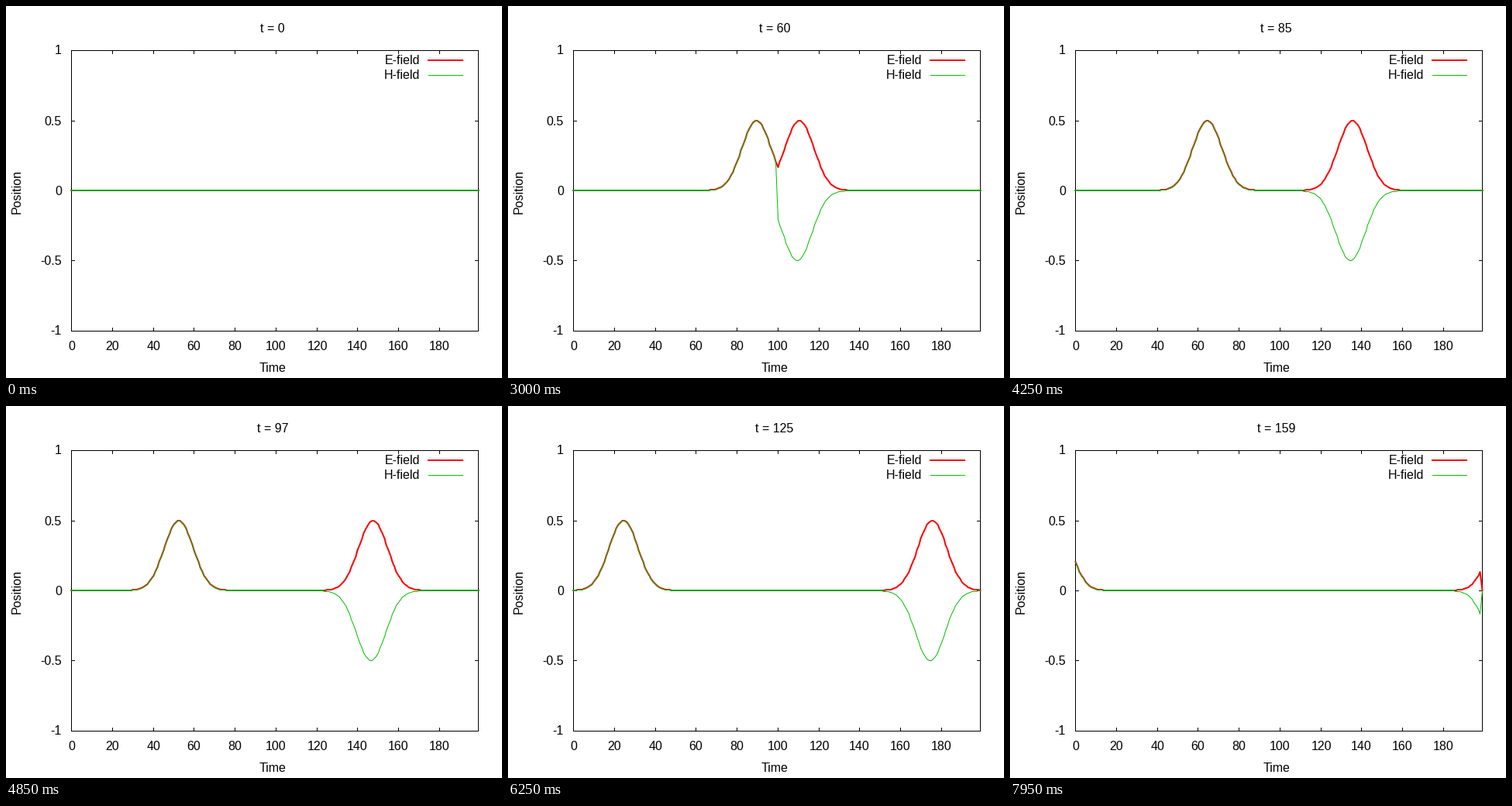
A matplotlib script that plays this animation: 640x480 px, repeating every 8 s.

```python
import numpy as np
import matplotlib.pyplot as plt
from matplotlib.animation import FuncAnimation

W, H, DPI = 640, 480, 100
PX = 72 / DPI                      # one pixel in points
LEFT, RIGHT, TOP, BOTTOM = 84.5, 609.5, 57.5, 419.5
CELLS, SOURCE, FRAMES = 200, 100, 160
RED, GREEN, REST = "#ff0000", "#00c000", "#00a000"

plt.rcParams["font.family"] = "Liberation Sans"
plt.rcParams["path.simplify"] = False

fig = plt.figure(figsize=(W / DPI, H / DPI), dpi=DPI, facecolor="white")
ax = fig.add_axes([0, 0, 1, 1])
ax.set_xlim(0, W)
ax.set_ylim(H, 0)
ax.axis("off")


def to_x(k):
    return LEFT + np.round(np.asarray(k) * (RIGHT - LEFT) / (CELLS - 1))


def to_y(v):
    mid, half = (TOP + BOTTOM) / 2, (BOTTOM - TOP) / 2
    return mid - np.round(np.asarray(v) * half)


def stroke(xs, ys, color="black", width=1, z=2, cap="projecting"):
    line, = ax.plot(xs, ys, color=color, lw=width * PX, zorder=z,
                    solid_capstyle=cap, solid_joinstyle="round", snap=False)
    return line


def label(x, y, text, align="center", turn=0):
    return ax.text(x, y, text, size=16 * PX, ha=align, va="baseline",
                   rotation=turn, rotation_mode="anchor")


def draw_axes():
    stroke([LEFT, RIGHT, RIGHT, LEFT, LEFT], [TOP, TOP, BOTTOM, BOTTOM, TOP])
    for k in range(0, CELLS, 20):
        x = to_x(k)
        stroke([x, x], [TOP, TOP + 4], z=1)
        stroke([x, x], [BOTTOM, BOTTOM - 4], z=1)
        label(x, 443.5, str(k))
    for v in (-1, -0.5, 0, 0.5, 1):
        y = to_y(v)
        stroke([LEFT, LEFT + 4], [y, y], z=1)
        stroke([RIGHT, RIGHT - 4], [y, y], z=1)
        label(72, y + 5, f"{v:g}", "right")
    label(344, 471.5, "Time")
    label(18.5, 239.5, "Position", turn=90)


def draw_legend():
    label(534, 75, "E-field", "right")
    label(534, 94, "H-field", "right")
    stroke([544, 590], [70, 70], RED, 2, cap="butt")
    stroke([545, 590], [89.5, 89.5], GREEN, 1, cap="butt")


def pulse(n):
    return 0.5 * np.exp(-((n - 49.5) / 10) ** 2)


def fields(t):
    """Both fields on the staggered grid; the last cell is held at zero."""
    k = np.arange(CELLS)
    e = pulse(t - np.abs(k - SOURCE))
    h = np.where(k < SOURCE, pulse(t - (SOURCE - k)),
                 -pulse(t - 1 - (k - SOURCE)))
    e[-1] = h[-1] = 0
    return e, h


draw_axes()
draw_legend()
title = label(343.8, 33.5, "")
xs = to_x(np.arange(CELLS))
e_line = stroke(xs, xs, RED, 2, z=3)
h_line = stroke(xs, xs, GREEN, 1, z=4)
rest_line = stroke(xs, xs, REST, 2, z=5)


def update(t):
    e, h = (to_y(f) for f in fields(t))
    zero = to_y(0)
    flat = (e == zero) & (h == zero)
    e_line.set_ydata(e - 0.5)
    h_line.set_ydata(h)
    rest_line.set_ydata(np.where(flat, zero - 0.5, np.nan))
    title.set_text(f"t = {t}")
    return e_line, h_line, rest_line, title


anim = FuncAnimation(fig, update, frames=FRAMES, interval=50,
                     init_func=lambda: update(0), repeat=True, repeat_delay=0)
plt.show()
```
